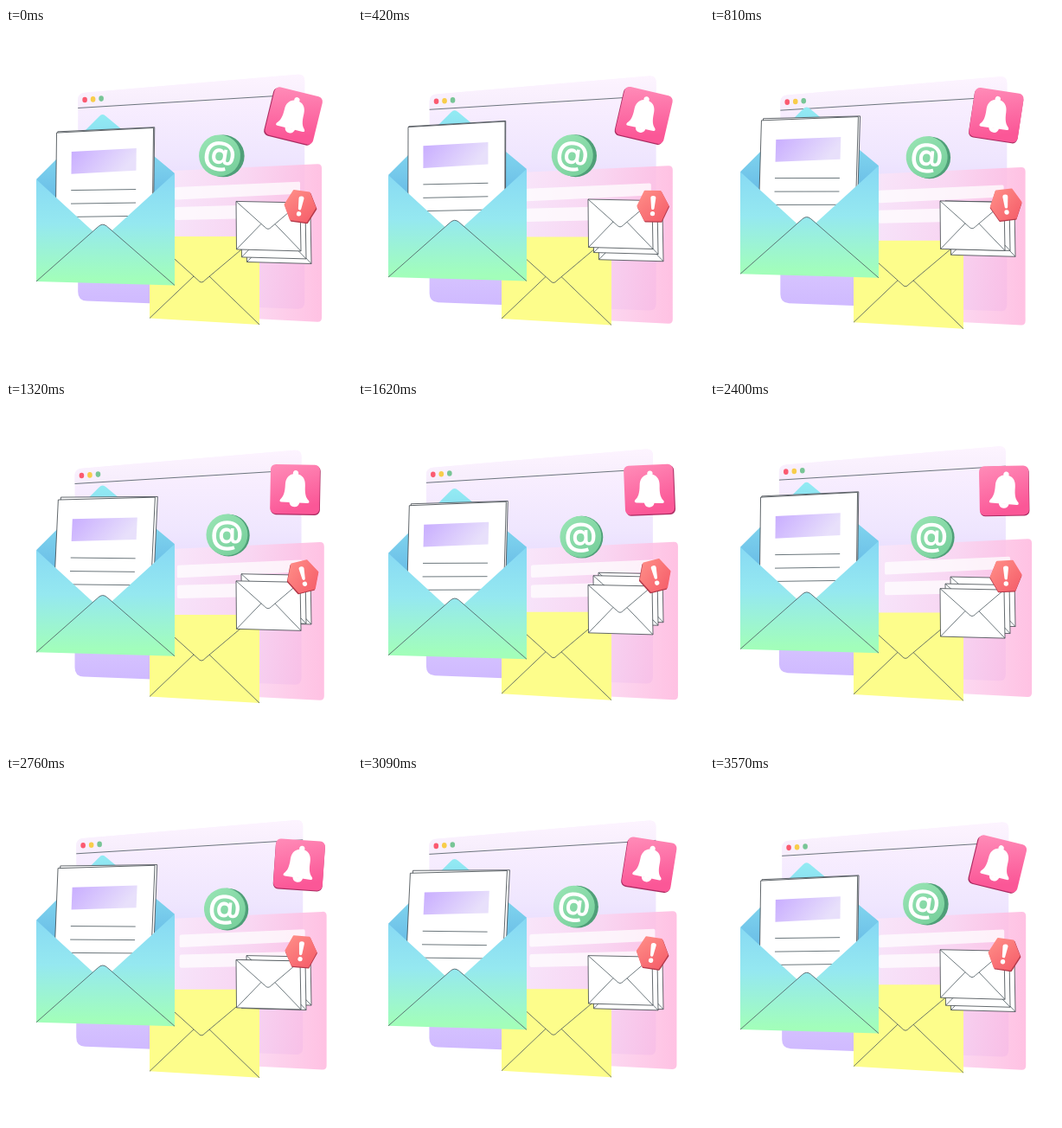
Write an HTML page that moves like this. It is 400 by 400 pixels and loops after 3.6 s.

```html
<!DOCTYPE html>
<html lang="en">
<head>
<meta charset="utf-8">
<title>Mail notifications</title>
<style>
  @property --a { syntax: '<angle>'; inherits: true; initial-value: 0deg; }
  @keyframes turn { from { --a: 0deg; } to { --a: 360deg; } }

  html, body { margin: 0; width: 100%; height: 100%; overflow: hidden; background: #fff; }
  svg { display: block; width: 100vw; height: 100vh; animation: turn 3600ms linear infinite; }

  /* Harmonic drift: amplitudes x, y, r with phases u, v, w; k cycles per loop */
  .drift {
    --k: 1; --x: 0px; --y: 0px; --r: 0deg; --r0: 0deg; --u: 0deg; --v: 0deg; --w: 0deg;
    transform:
      translate(calc(var(--x) * cos(var(--k) * var(--a) - var(--u))),
                calc(var(--y) * cos(var(--k) * var(--a) - var(--v))))
      rotate(calc(var(--r0) + var(--r) * cos(var(--k) * var(--a) - var(--w))));
  }
  .window { --x: 2.2px; --y: 2.7px; --v: 90deg; }
  .panel  { --x: -4.2px; --u: 45deg; --y: 2.9px; --v: 133deg; }
  .blue   { --k: 2; --y: 4.4px; --v: -14deg; }
  .yellow { --k: 2; --y: -3.4px; --v: 36deg; }
  .bell   { --x: -4.7px; --u: 57deg; --y: -.9px; --v: 90deg; --r0: 5.2deg; --r: 8.9deg; --w: 14deg; }
  .bell-edge { --x: -1.1px; }
  .bell-icon { --x: -1px; --u: 40deg; --r0: 2.2deg; --r: -3.5deg; --w: 50deg; }
  .at     { --x: -4.8px; --u: 12deg; --y: -5px; --v: 24deg; }
  .at-side { --x: .6px; }
  .at-face { --x: -.8px; --r0: 4deg; --r: 5deg; }
  .mail1  { --y: -9px; --v: 43deg; }
  .mail2  { --y: 7.5px; --v: -63deg; }
  .mail3  { --y: 9px; --v: -4deg; }
  .alert  { --x: -1.9px; --u: -20deg; --y: 3px; --v: 12deg; --r0: -1deg; --r: 12deg; --w: -30deg; }
  .alert-edge { --x: 1.2px; --u: -20deg; }

  .sheet {
    --c: cos(2 * var(--a) - 60deg);
    transform:
      translate(calc(59.2px - 1.3px * var(--c)), calc(113.8px + 7.3px * cos(2 * var(--a))))
      skewY(calc(-2.4deg - 1deg * var(--c)))
      skewX(calc(-1.4deg + 1.4deg * var(--c)));
  }
  .under {
    transform:
      translate(calc(1.8px - 1.2px * var(--c)), calc(-1.8px + 1.2px * var(--c)))
      skewY(calc(.6deg - .6deg * var(--c)));
  }
  .page { fill: #fff; stroke: #3d4449; stroke-width: .8; }
  .line { fill: none; stroke: #48565c; stroke-width: .8; }
</style>
</head>
<body>
<svg viewBox="0 0 400 400">
  <defs>
    <linearGradient id="gWindow" x2="0" y2="1">
      <stop offset="0" stop-color="#fdf2ff"/><stop offset=".35" stop-color="#efe6fe"/>
      <stop offset="1" stop-color="#ceb8ff"/>
    </linearGradient>
    <linearGradient id="gHead" x2="0" y2="1">
      <stop offset="0" stop-color="#fdf4ff"/><stop offset="1" stop-color="#f6edfc"/>
    </linearGradient>
    <linearGradient id="gPanel">
      <stop offset=".07" stop-color="#fae6f9"/><stop offset=".54" stop-color="#fbd5f0"/>
      <stop offset="1" stop-color="#ffb9df"/>
    </linearGradient>
    <linearGradient id="gInside" x2="0" y2="1">
      <stop offset="0" stop-color="#93ebf3"/><stop offset=".25" stop-color="#85d9f0"/>
      <stop offset=".75" stop-color="#62b6e4"/>
    </linearGradient>
    <linearGradient id="gFront" x2="0" y2="1">
      <stop offset="0" stop-color="#86d8f4"/><stop offset=".45" stop-color="#95e8f0"/>
      <stop offset=".95" stop-color="#a2feba"/>
    </linearGradient>
    <linearGradient id="gBanner" x2="1" y2=".3">
      <stop offset="0" stop-color="#c9aeff"/><stop offset="1" stop-color="#e8e0fb"/>
    </linearGradient>
    <linearGradient id="gBell" x2=".3" y2="1">
      <stop offset="0" stop-color="#ff8cb8"/><stop offset="1" stop-color="#fb5797"/>
    </linearGradient>
    <linearGradient id="gAt" x2="1" y2="1">
      <stop offset="0" stop-color="#9be6b6"/><stop offset="1" stop-color="#74cd99"/>
    </linearGradient>
    <linearGradient id="gAlert" x2="1" y2="1">
      <stop offset="0" stop-color="#ff8f88"/><stop offset="1" stop-color="#f55c69"/>
    </linearGradient>
    <g id="mail">
      <path class="page" d="M0 0 74 1.500 75 57.500 .5 55.500Z"/>
      <path class="line" d="M0 0 33.500 30Q37 33.800 40.500 30L74 1.500M.5 55.500 29 26M75 57.500 45 26.300"/>
    </g>
    <path id="hex" d="M-17.500 1-10-16.500 8-17 17.500-1 10 16.500-8.500 17Z" stroke-width="2" stroke-linejoin="round"/>
  </defs>

  <g class="drift window">
    <path fill="url(#gWindow)" d="M81 83Q81 75.500 89 74.800L335 53.700Q343 53 343 61V317Q343 325 335 324.700L91 315.500Q81 315 81 305Z"/>
    <path fill="url(#gHead)" d="M81 92.500V83Q81 75.500 89 74.800L335 53.700Q343 53 343 61V76.500Z"/>
    <path class="line" d="M81 92.500 343 76.500"/>
    <ellipse cx="88.900" cy="83" rx="2.800" ry="3.300" fill="#fb5a70"/>
    <ellipse cx="98.400" cy="82.400" rx="2.800" ry="3.300" fill="#f8cd4a"/>
    <ellipse cx="107.900" cy="81.600" rx="2.800" ry="3.300" fill="#78c596"/>
  </g>

  <g class="drift panel">
    <path fill="url(#gPanel)" opacity=".88" d="M180 167.600 363 159.200Q368 159 368 164V337Q368 342 363 341.800L180 332.500Z"/>
    <g fill="#fff" opacity=".75">
      <path d="M198 188Q198 186 200 185.900L341 179.600Q343 179.500 343 181.500V191.500Q343 193.500 341 193.600L200 200.400Q198 200.500 198 198.500Z"/>
      <path d="M198 211Q198 209 200 208.900L341 205V221L200 224Q198 224 198 222Z"/>
    </g>
  </g>

  <g transform="translate(254 152.500)"><g class="drift at">
    <g class="drift at-side"><circle cx="1.300" r="24.400" fill="#4f9f78"/></g>
    <g transform="translate(-1.500 -.5)"><g class="drift at-face">
      <circle r="24" fill="url(#gAt)"/>
      <text y="10.500" text-anchor="middle" font-family="Inter, 'Open Sans', sans-serif" font-size="37" font-weight="700" fill="#fff">@</text>
    </g></g>
  </g></g>

  <g transform="translate(335.300 101.500)"><g class="drift bell">
    <g class="drift bell-edge"><rect x="-28.500" y="-27.300" width="57" height="57" rx="6" fill="#ab2c62"/></g>
    <rect x="-28.500" y="-28.500" width="57" height="57" rx="6" fill="url(#gBell)"/>
    <g class="drift bell-icon" fill="#fff">
      <path d="M-3-17.500A3.200 3.200 0 1 1 3-17.500C9-16 11.500-11 11.500-5C11.500 5 13 9 16.500 12.500Q18 15.500 15 15.500H-15Q-18 15.500-16.500 12.500C-13 9-11.500 5-11.500-5C-11.500-11-9-16-3-17.500Z"/>
      <path d="M-6 15H6Q5 20.500 0 20.500-5 20.500-6 15Z"/>
    </g>
  </g></g>

  <g class="drift yellow"><g transform="translate(0 2.750)">
    <path fill="#fdfd8b" d="M166 241H293V343L166 335.500Z"/>
    <path class="line" stroke="#6f7650" d="M166 241 222 291.500Q226 296.500 230 291.500L293 238.500M166 335.500 217 287M293 343 235 287"/>
  </g></g>

  <g transform="translate(278 206)"><use class="drift mail3" href="#mail"/></g>
  <g transform="translate(272 206)"><use class="drift mail2" href="#mail"/></g>
  <g transform="translate(266 207)"><use class="drift mail1" href="#mail"/></g>

  <g transform="translate(341.800 203)"><g class="drift alert">
    <use class="drift alert-edge" href="#hex" y="1.200" fill="#b4394a" stroke="#b4394a"/>
    <use href="#hex" fill="url(#gAlert)" stroke="url(#gAlert)"/>
    <g fill="#fff">
      <path d="M-3-9Q-3-11.500 0-11.500 3-11.500 3-9L1.700 3Q1.500 4.500 0 4.500-1.500 4.500-1.700 3Z"/>
      <circle cy="9" r="2.700"/>
    </g>
  </g></g>

  <g class="drift blue"><path transform="translate(0 -4.300)" fill="url(#gInside)" d="M35 175 107.500 102.500Q111.500 98 115.500 102L195 168 150 250H80Z"/></g>

  <g class="sheet">
    <path class="page under" d="M0 0H112V135H0Z"/>
    <path class="page" d="M0 0H112V135H0Z"/>
    <path fill="url(#gBanner)" d="M17.500 22.700h75v25.700h-75Z"/>
    <path class="line" transform="skewY(2.100)" d="M17.500 66.700h75M17.500 82.200h75M17.500 97.500h75"/>
  </g>

  <g class="drift blue"><g transform="translate(0 -4.300)">
    <path fill="url(#gFront)" d="M35 175 100.500 235 106.500 229.800Q111.500 225 116.500 229.200L122.500 234 195 168V297.500L35 293Z"/>
    <path class="line" stroke="#4d7f80" d="M35 293 106.500 229.800Q111.500 225 116.500 229.200L195 297.500"/>
  </g></g>
</svg>
</body>
</html>
```
